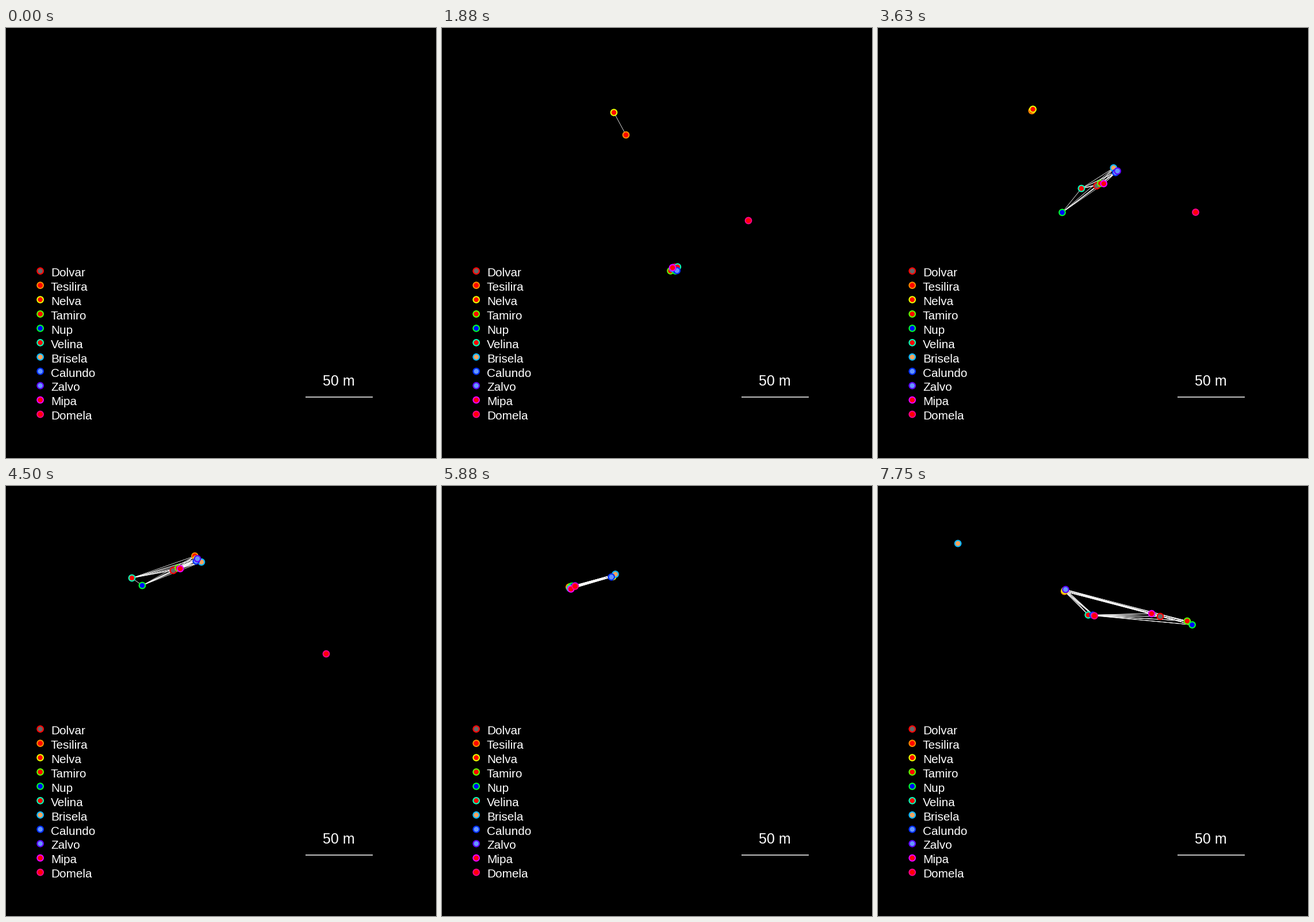
These frames come from a looping animation (748x748 px, 8000 ms). A matplotlib script:

```python
import colorsys
from itertools import combinations

import matplotlib.pyplot as plt
import numpy as np
from matplotlib.animation import FuncAnimation
from matplotlib.collections import LineCollection

SIZE, DPI = 748, 100
FRAMES, INTERVAL = 64, 125
PX = 72 / DPI
HOLDS = {3, 23, 27, 35, 54, 55, 59, 63}

NAMES = "Dolvar Tesilira Nelva Tamiro Nup Velina Brisela Calundo Zalvo Mipa Domela".split()
SPECIAL_FILLS = {"Dolvar": "#696969", "Nup": "blue", "Brisela": "#f4a460",
                 "Calundo": "#6496ff", "Zalvo": "#6496ff"}
FILLS = [SPECIAL_FILLS.get(name, "red") for name in NAMES]
RINGS = [colorsys.hsv_to_rgb(k / len(NAMES), 1, 1) for k in range(len(NAMES))]

CLOCK = np.cumsum([f not in HOLDS for f in range(FRAMES)])
rng = np.random.default_rng(4)
waypoints = {name: {} for name in NAMES}


def gather(frame, spot, *members):
    """Send members to a spot, loosely scattered when they share it."""
    spread = (5, 3.5) if len(members) > 1 else 0
    for name in members:
        waypoints[name][frame] = np.clip(rng.normal(0, 1, 2), -1.5, 1.5) * spread + spot


# The herd sets out while a pair and one loner go their own way.
gather(1, (510, 455), *NAMES)
gather(10, (342, 218), "Tesilira", "Nelva")
gather(15, (405, 419), *NAMES)
gather(15, (320, 186), "Tesilira")
gather(15, (299, 147), "Nelva")
gather(6, (581, 400), "Domela")
gather(15, (533, 335), "Domela")

gather(22, (462, 376), "Dolvar", "Tamiro", "Velina", "Mipa", "Domela")
gather(22, (222, 158), "Tesilira", "Nelva")
gather(22, (468, 336), "Brisela")
gather(22, (488, 347), "Calundo", "Zalvo")
gather(22, (390, 444), "Nup")

# They regroup in the north; the loner strays east and returns.
gather(36, (336, 127), "Tesilira", "Nelva", "Brisela", "Calundo", "Zalvo")
gather(36, (307, 148), "Tamiro", "Mipa")
gather(36, (291, 147), "Dolvar")
gather(36, (237, 173), "Nup")
gather(36, (219, 160), "Velina")
gather(26, (551, 330), "Domela")
gather(36, (557, 292), "Domela")
gather(42, (388, 198), "Domela")

gather(47, (224, 174), *NAMES)
gather(47, (294, 154), "Nelva", "Brisela", "Calundo")

gather(53, (299, 150), "Dolvar", "Tamiro", "Velina")
gather(53, (296, 166), "Nup")
gather(53, (285, 159), "Zalvo", "Mipa")
gather(53, (241, 158), "Tesilira", "Brisela")
gather(53, (156, 135), "Nelva")
gather(53, (247, 187), "Calundo")
gather(53, (210, 161), "Domela")

gather(62, (325, 182), "Tesilira", "Nelva", "Zalvo")
gather(62, (369, 225), "Velina", "Calundo", "Domela")
gather(62, (476, 222), "Mipa")
gather(62, (491, 227), "Dolvar")
gather(62, (540, 238), "Tamiro", "Nup")
gather(62, (139, 100), "Brisela")


def build_track(points):
    points[58] = points[53] + 0.36 * (points[62] - points[53])
    keys = sorted(points)
    path = np.array([points[k] for k in keys])
    return np.column_stack([np.interp(CLOCK, CLOCK[keys], axis) for axis in path.T])


TRACKS = np.array([build_track(waypoints[name]) for name in NAMES])


def group_links(points, reach):
    """Join every pair within each chain of neighbours closer than reach."""
    group = list(range(len(points)))
    pairs = list(combinations(group, 2))
    for a, b in pairs:
        if np.hypot(*(points[a] - points[b])) < reach:
            old, new = group[b], group[a]
            group = [new if g == old else g for g in group]
    return [(points[a], points[b]) for a, b in pairs if group[a] == group[b]]


fig = plt.figure(figsize=(SIZE / DPI, SIZE / DPI), dpi=DPI, facecolor="black")
ax = fig.add_axes([0, 0, 1, 1])
ax.set(xlim=(0, SIZE), ylim=(SIZE, 0))
ax.axis("off")


def dots(points, zorder):
    x, y = np.transpose(points)
    return ax.scatter(x, y, s=(10.6 * PX) ** 2, c=FILLS, edgecolors=RINGS,
                      linewidths=2.1 * PX, zorder=zorder)


def label(x, y, text, pixels, ha="left"):
    ax.text(x, y, text, color="white", fontsize=pixels * PX,
            family="Liberation Sans", ha=ha, va="baseline")


rows = 422.7 + 24.93 * np.arange(len(NAMES))
dots([(59.6, y) for y in rows], 2)
for y, name in zip(rows, NAMES):
    label(78, y + 9.3, name, 20.8)
label(579, 622, "50 m", 25, "center")
ax.plot([521.5, 638], [642, 642], color="white", lw=1.5 * PX, solid_capstyle="butt")

links = ax.add_collection(LineCollection([], colors="white", linewidths=0.75 * PX, zorder=3))
herd = dots(TRACKS[:, 1], 4)


def draw(frame):
    points = TRACKS[:, frame]
    # Groups hold together over longer gaps once they spread out at the end.
    reach = 80 if frame < 56 else 117
    links.set_segments(group_links(points, reach) if frame else [])
    herd.set_offsets(points)
    herd.set_visible(frame > 0)
    return links, herd


animation = FuncAnimation(fig, draw, frames=FRAMES, interval=INTERVAL,
                          repeat=True, repeat_delay=0)
plt.show()
```
